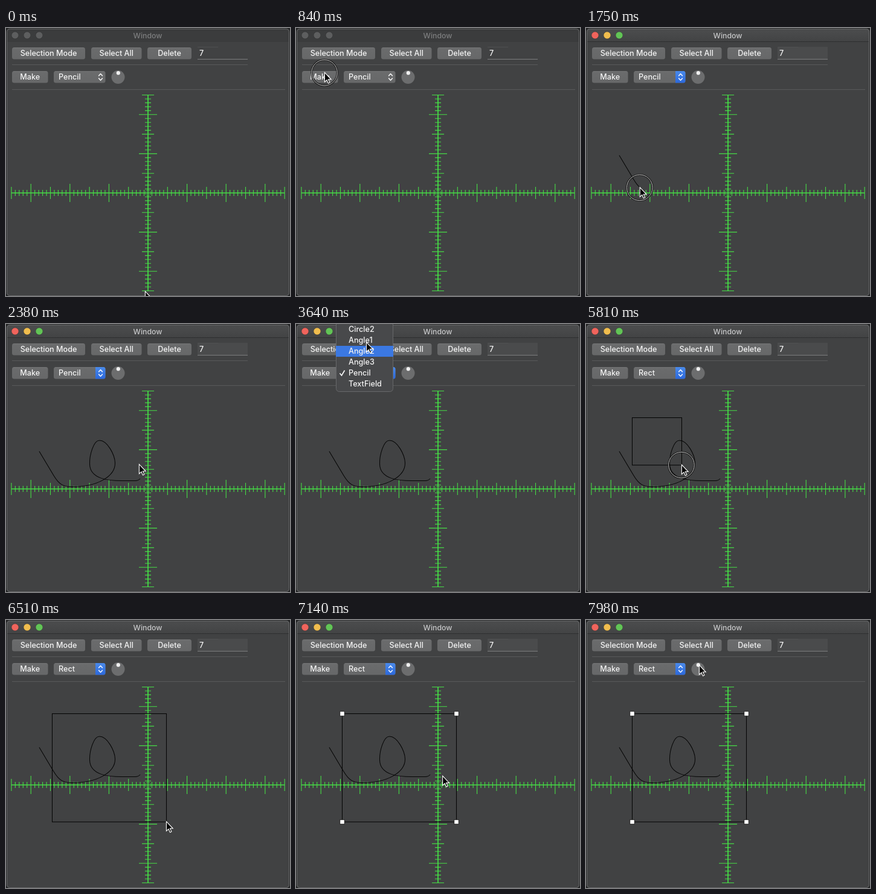
Write an HTML page that moves like this. It is 470 px wide and 442 px high and loops after 8 s.

```html
<!DOCTYPE html>
<html lang="en">
<head>
<meta charset="utf-8">
<title>Window</title>
<style>
  html, body { margin: 0; width: 100%; height: 100%; overflow: hidden; background: #242526; }
  svg { display: block; width: 470px; height: 442px; }
  text { font: 500 12.6px Inter, "Open Sans", sans-serif; fill: #f4f4f4; }
  .title { font-size: 12.3px; fill: #c6c7c8; text-anchor: middle; }
  .label { text-anchor: middle; }
  .btn { fill: url(#btnFill); }
  .rule { fill: #58595a; }
  .light { stroke: #0003; stroke-width: .8; }
  .ink { fill: none; stroke: #050505; stroke-width: 1.05; }
  .chevron { fill: none; stroke: #fff; stroke-width: 1.4; stroke-linecap: round; stroke-linejoin: round; }
  .axes { fill: none; stroke: #46dc46; }
  .idle .title { fill: #7d7e7f; }
  .idle .light { fill: #5d5e5f; }
  .idle .on { display: none; }
</style>
</head>
<body>
<svg id="stage" viewBox="0 0 470 442">
  <defs>
    <linearGradient id="btnFill" x2="0" y2="1">
      <stop offset="0" stop-color="#737475"/><stop offset=".12" stop-color="#6a6b6c"/><stop offset="1" stop-color="#676869"/>
    </linearGradient>
    <linearGradient id="barFill" x2="0" y2="1">
      <stop offset="0" stop-color="#4d4e4f"/><stop offset="1" stop-color="#424344"/>
    </linearGradient>
    <linearGradient id="blueFill" x2="0" y2="1">
      <stop offset="0" stop-color="#4a8aea"/><stop offset="1" stop-color="#2b68dc"/>
    </linearGradient>
    <clipPath id="frame"><rect x="1" y="1" width="468" height="441" rx="5"/></clipPath>
  </defs>

  <g clip-path="url(#frame)">
    <rect width="470" height="442" fill="#414243"/>
    <rect width="470" height="23" fill="#3b3c3d"/>
    <g class="on">
      <rect width="470" height="23" fill="url(#barFill)"/>
      <rect y="22" width="470" height="1" fill="#2e2f30"/>
    </g>
  </g>
  <rect x="1.5" y="1.5" width="467" height="440" rx="5" fill="none" stroke="#68696a"/>
  <g id="lights"></g>
  <text class="title" x="234.5" y="17">Window</text>

  <g id="buttons"></g>
  <rect class="on" x="317" y="31" width="83" height="20" fill="#4a4b4c"/>
  <rect x="317" y="31" width="34" height="1" fill="#4f5051"/>
  <rect x="317" y="51" width="83" height="1" fill="#7b7c7d"/>
  <text x="320" y="46">7</text>
  <rect class="rule" x="10" y="60" width="390" height="1"/>
  <rect class="rule" x="10" y="101" width="452" height="1"/>

  <rect class="btn" x="79" y="71" width="85.5" height="19.5" rx="3.5"/>
  <path class="on" d="M148 71h13a3.5 3.5 0 0 1 3.5 3.5v12.5a3.5 3.5 0 0 1-3.5 3.5h-13z" fill="url(#blueFill)"/>
  <path class="chevron" d="M153.5 78.8l3-3.2 3 3.2M153.5 83l3 3.2 3-3.2"/>
  <text id="choice" x="87" y="85.3">Pencil</text>
  <circle cx="185.5" cy="81" r="11" fill="#6c6d6e"/>
  <circle cx="185.8" cy="74.2" r="3.1" fill="#f0f0f0"/>

  <path class="axes" id="ticks" stroke-width="1.1"/>
  <path class="axes" d="M9 272H461M235 110V434" stroke-width="1.7"/>
  <circle class="axes" cx="235" cy="272" r="4.6" stroke-width=".6"/>

  <path class="ink" id="scribble" pathLength="1" d="M55 210L79 250C88 265 95 268.5 110 268.5
    C150 268.5 181 252 180.5 229C180 216 168 192 154.5 192C145 192 138 216 138.5 231
    C139 256 170 258.5 192 258.5H214Q219 258.5 222 255"/>
  <rect class="ink" id="box" x="76.5" y="154.5"/>
  <g id="handles" fill="#fff" stroke="#111" stroke-width=".8"></g>

  <g id="menu">
    <rect x="66.5" y="-90" width="94" height="201.5" rx="5" fill="#48494b" stroke="#67686a"/>
    <rect id="hover" x="66" width="95" height="18" fill="#3b78e2"/>
    <path d="M72.5 81.3l3 3.6 5-8.4" fill="none" stroke="#fff" stroke-width="1.6"/>
  </g>

  <g id="ring" fill="none">
    <circle r="21.3" stroke="#151515" stroke-width="3"/>
    <circle r="21.3" stroke="#c4c4c4" stroke-width="1"/>
  </g>
  <path id="cursor" d="M.4 .4V16L4 12.7L6.5 18.2L8.9 17.1L6.4 11.8H11.2Z" fill="#000" stroke="#fff" stroke-width="1.1"/>
</svg>

<script>
const $ = id => document.getElementById(id);

function add(parent, tag, attrs, text) {
  const el = document.createElementNS('http://www.w3.org/2000/svg', tag);
  for (const k in attrs) el.setAttribute(k, attrs[k]);
  if (text) el.textContent = text;
  return $(parent).appendChild(el);
}

function button(x, y, w, text) {
  add('buttons', 'rect', { class: 'btn', x, y, width: w, height: 19.5, rx: 3.5 });
  add('buttons', 'text', { class: 'label', x: x + w / 2, y: y + 14.3 }, text);
}
button(10, 32, 121, 'Selection Mode');
button(141, 32, 83.5, 'Select All');
button(234, 32, 73, 'Delete');
button(10, 71, 59.5, 'Make');

['#f0645c', '#f0bd4e', '#62c456'].forEach((fill, i) =>
  add('lights', 'circle', { class: 'light', cx: 15 + 20 * i, cy: 12, r: 5.8, fill }));

// Ruler: long mark every 10 ticks, medium every 5
const UNIT = 6.46;
let marks = '';
for (let i = -35; i <= 35; i++) {
  if (!i) continue;
  const h = i % 10 === 0 ? 15 : i % 5 === 0 ? 10 : 5, d = i * UNIT;
  marks += `M${235 + d} ${272 - h}v${2 * h}`;
  if (Math.abs(i) <= 25) marks += `M${235 - h} ${272 + d}h${2 * h}`;
}
$('ticks').setAttribute('d', marks);

const ROW = 18;
['Circle2', 'Angle1', 'Angle2', 'Angle3', 'Pencil', 'TextField'].forEach((name, i) =>
  add('menu', 'text', { x: 87, y: 12.7 + ROW * i }, name));

for (const x of [76.5, 265.5]) for (const y of [154.5, 333])
  add('handles', 'rect', { x: x - 3.7, y: y - 3.7, width: 7.4, height: 7.4 });

const LOOP = 8000, STEP = 70;
const PRESS = 770, ACTIVE = 910;
const DRAW = 1575, DRAWN = 2240;
const OPEN = 3010, PICK = 4200, CLOSE = 4480;
const DRAG = 5400, DROP = 6300, SELECT = 6650;

// pointer moves: leave, arrive, x, y; it rests in between
const moves = [
  [0, PRESS, 47, 73],
  [930, 1400, 55, 210],
  [DRAW, DRAWN, 222, 255],
  [DRAWN, 2380, 220, 231],
  [2380, 2870, 118, 82],
  [3395, 3895, 114, -26],
  [4270, 4340, 115, 5],
  [4410, 4900, 113, 167],
  [4900, 5250, 76, 155],
  [DRAG, DROP, 265, 332],
  [6790, 7770, 187, 74]
];

const curve = $('scribble');
const curveLength = curve.getTotalLength();

function ease(t, a, b) {
  const u = Math.max(0, Math.min(1, (t - a) / (b - a)));
  return u * u * (3 - 2 * u);
}
const within = (t, a, b) => t >= a && t < b;

function pointer(t) {
  if (within(t, DRAW, DRAWN)) {
    const p = curve.getPointAtLength(ease(t, DRAW, DRAWN) * curveLength);
    return [p.x, p.y];
  }
  let x = 230, y = 434;
  for (const [leave, arrive, toX, toY] of moves) {
    const u = ease(t, leave, arrive);
    x += (toX - x) * u;
    y += (toY - y) * u;
  }
  return [x, y];
}

const place = (id, x, y) => $(id).setAttribute('transform', `translate(${x} ${y})`);
const show = (id, on) => { $(id).style.display = on ? '' : 'none'; };

function render(t) {
  const [x, y] = pointer(t);
  place('cursor', x, y);
  place('ring', x, y + .8);
  show('ring', within(t, PRESS, ACTIVE) || within(t, DRAW, DRAWN) ||
    within(t, OPEN - STEP, OPEN) || within(t, DRAG, DROP + STEP));
  $('stage').classList.toggle('idle', t < ACTIVE);
  $('choice').textContent = t < CLOSE ? 'Pencil' : 'Rect';

  const part = ease(t, DRAW, DRAWN);
  show('scribble', part > 0);
  curve.style.strokeDasharray = part < 1 ? `${part} 2` : 'none';

  show('menu', within(t, OPEN, CLOSE + STEP));
  $('menu').style.opacity = t < CLOSE ? 1 : .5;
  // the highlight trails the pointer by one step and stays put once picked
  const hoverY = pointer(Math.min(t, PICK) - STEP)[1];
  $('hover').setAttribute('y', ROW * Math.floor(hoverY / ROW));

  const [right, bottom] = pointer(Math.min(t, DROP));
  show('box', t > DRAG);
  $('box').setAttribute('width', Math.max(0, right - 76));
  $('box').setAttribute('height', Math.max(0, bottom - 153.5));
  show('handles', t >= SELECT);
}

const start = performance.now();
function tick() {
  const t = (performance.now() - start) % LOOP;
  render(Math.floor(t / STEP) * STEP);
  requestAnimationFrame(tick);
}
tick();
</script>
</body>
</html>
```
